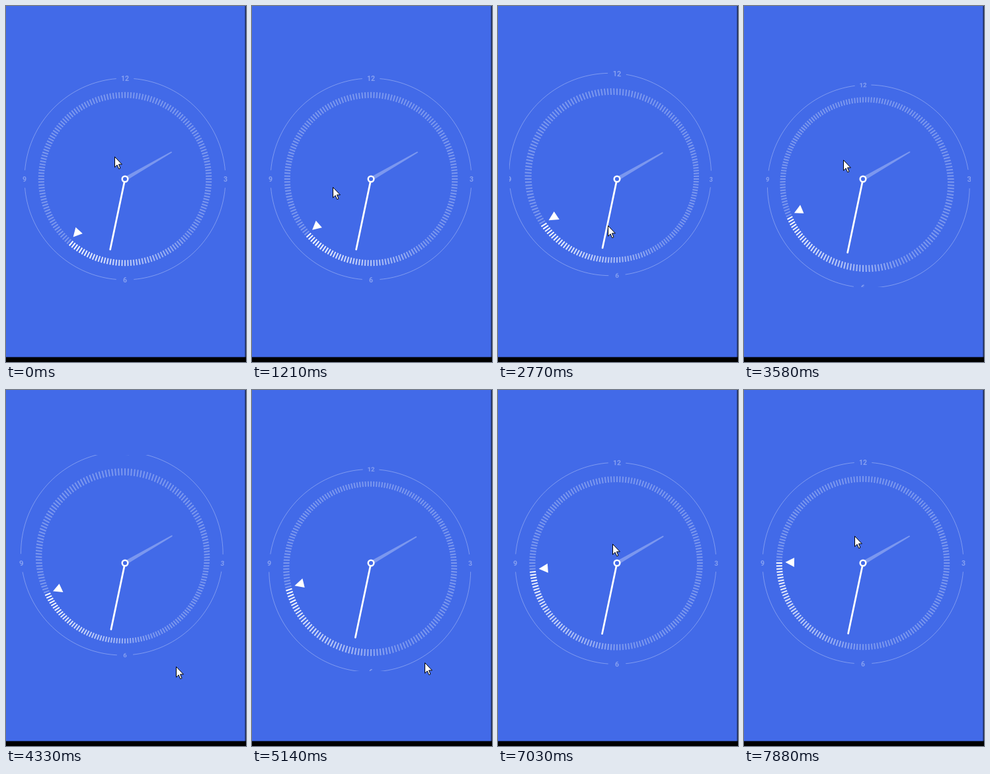
An HTML page that plays this animation: 363x537 px, repeating every 8000 ms.

```html
<!DOCTYPE html>
<html lang="en">
<head>
<meta charset="utf-8">
<title>Tilting clock</title>
<style>
html, body { margin: 0; width: 100%; height: 100%; overflow: hidden; background: #000; }
svg { display: block; width: 100vw; height: 100vh; }
text { font: 700 10.5px Roboto, Arial, sans-serif; text-anchor: middle; fill: #fff; fill-opacity: .36; }
</style>
</head>
<body>
<svg viewBox="0 0 363 537">
  <defs><clipPath id="box"><rect x="-163" y="-163" width="326" height="326"/></clipPath></defs>
  <rect width="363" height="537" fill="#000"/>
  <rect width="363" height="529.5" fill="#1c2a55"/>
  <rect width="361.5" height="529.5" fill="#426ae8"/>
  <g transform="translate(180 261)">
    <g id="clock" clip-path="url(#box)"></g>
  </g>
  <path id="cursor" d="M-.5 .5V16.2L3.1 12.8L5.7 18.7L8 17.7L5.5 11.9H10.4Z" fill="#fff" stroke="#000"/>
</svg>
<script>
const LOOP = 8000, STEP = 130, RING = 152, TICKS = 180;
const clock = document.getElementById('clock');
const cursor = document.getElementById('cursor');

// The tilt direction circles around: [time, direction in degrees, ring shift in px]
const swing = [[1210, -180, 0], [2770, 214, 12.4], [4330, 612, 15], [6020, 1060, 7.4], [7060, 1246, 2], [7840, 1350, 0]];
const path = [
  [0, 165, 227], [1210, 123, 273], [2000, 240, 300], [2770, 167, 331], [3500, 150, 230],
  [4330, 258, 417], [4750, 258, 417], [6020, 279, 384], [7060, 174, 232], [7840, 168, 220]
];

const linear = p => p;
const smooth = p => p * p * (3 - 2 * p);

function sample(keys, t, ease) {
  let i = 1;
  while (i < keys.length - 1 && keys[i][0] < t) i++;
  const [t0, x0, y0] = keys[i - 1], [t1, x1, y1] = keys[i];
  const e = ease(Math.min(1, Math.max(0, (t - t0) / (t1 - t0))));
  return [x0 + (x1 - x0) * e, y0 + (y1 - y0) * e];
}

function add(tag, attrs, text) {
  const el = document.createElementNS('http://www.w3.org/2000/svg', tag);
  for (const k in attrs) el.setAttribute(k, attrs[k]);
  if (text) el.textContent = text;
  return clock.appendChild(el);
}

// Clock angle and radius to a point, with an optional sideways offset
function polar(deg, r, side = 0) {
  const a = deg * Math.PI / 180, s = Math.sin(a), c = Math.cos(a);
  return [s * r + c * side, -c * r + s * side];
}

const ring = add('path', { fill: 'none', stroke: '#fff', 'stroke-opacity': .32 });
const labels = ['12', '3', '6', '9'].map((s, i) => ({ el: add('text', { y: 3.8 }, s), at: polar(i * 90, RING) }));
const ticks = Array.from({ length: TICKS }, () => add('path', { stroke: '#fff', 'stroke-width': 2 }));
const pointer = add('path', { fill: '#fff' });
const hour = add('path', { fill: '#fff', 'fill-opacity': .3 });
const minute = add('path', { stroke: '#fff', 'stroke-width': 2.7, 'stroke-linecap': 'round' });
add('circle', { r: 4.3, fill: '#426ae8', stroke: '#fff', 'stroke-width': 2.5 });

function draw(t) {
  const [dir, shift] = sample(swing, t, linear);
  const [ux, uy] = polar(dir + 90, -shift / RING ** 2);
  const depth = ([x, y]) => 1 + ux * x + uy * y;
  const line = pts => 'M' + pts.map(p => p.map(v => (v / depth(p)).toFixed(2)).join(' ')).join('L');
  const second = 221.6 + t * .00625;

  let d = '';
  for (let q = 0; q < 360; q += 90) {
    const arc = [];
    for (let a = 5; a <= 85; a += 2) arc.push(polar(q + a, RING));
    d += line(arc);
  }
  ring.setAttribute('d', d);

  // Local slope of the perspective, so the numerals lean with the dial
  for (const { el, at } of labels) {
    const [x, y] = at, w = depth(at), w2 = w * w;
    el.setAttribute('transform', `matrix(${[
      (w - ux * x) / w2, -y * ux / w2, -x * uy / w2, (w - uy * y) / w2, x / w, y / w
    ]})`);
  }

  ticks.forEach((el, i) => {
    const deg = i * 360 / TICKS;
    const behind = (second - deg + 360) % 360;
    el.setAttribute('d', line([polar(deg, 122.2), polar(deg, 131.2)]));
    el.setAttribute('stroke-opacity', (.31 + .69 * Math.max(0, 1 - behind / 90)).toFixed(3));
  });

  pointer.setAttribute('d', line([polar(second, 117.5), polar(second, 104, 7), polar(second, 104, -7)]) + 'Z');
  hour.setAttribute('d', line([polar(60, 4, 2.8), polar(60, 81, 1), polar(60, 82), polar(60, 81, -1), polar(60, 4, -2.8)]) + 'Z');
  minute.setAttribute('d', line([polar(191.9, 5), polar(191.9, 108.6)]));

  const [cx, cy] = sample(path, t, smooth).map(Math.round);
  cursor.setAttribute('transform', `translate(${cx} ${cy})`);
}

// The picture refreshes in short, even steps
let shown = -1;
function frame() {
  const step = Math.floor(performance.now() % LOOP / STEP);
  if (step !== shown) draw(step * STEP + 40);
  shown = step;
  requestAnimationFrame(frame);
}
frame();
</script>
</body>
</html>
```
